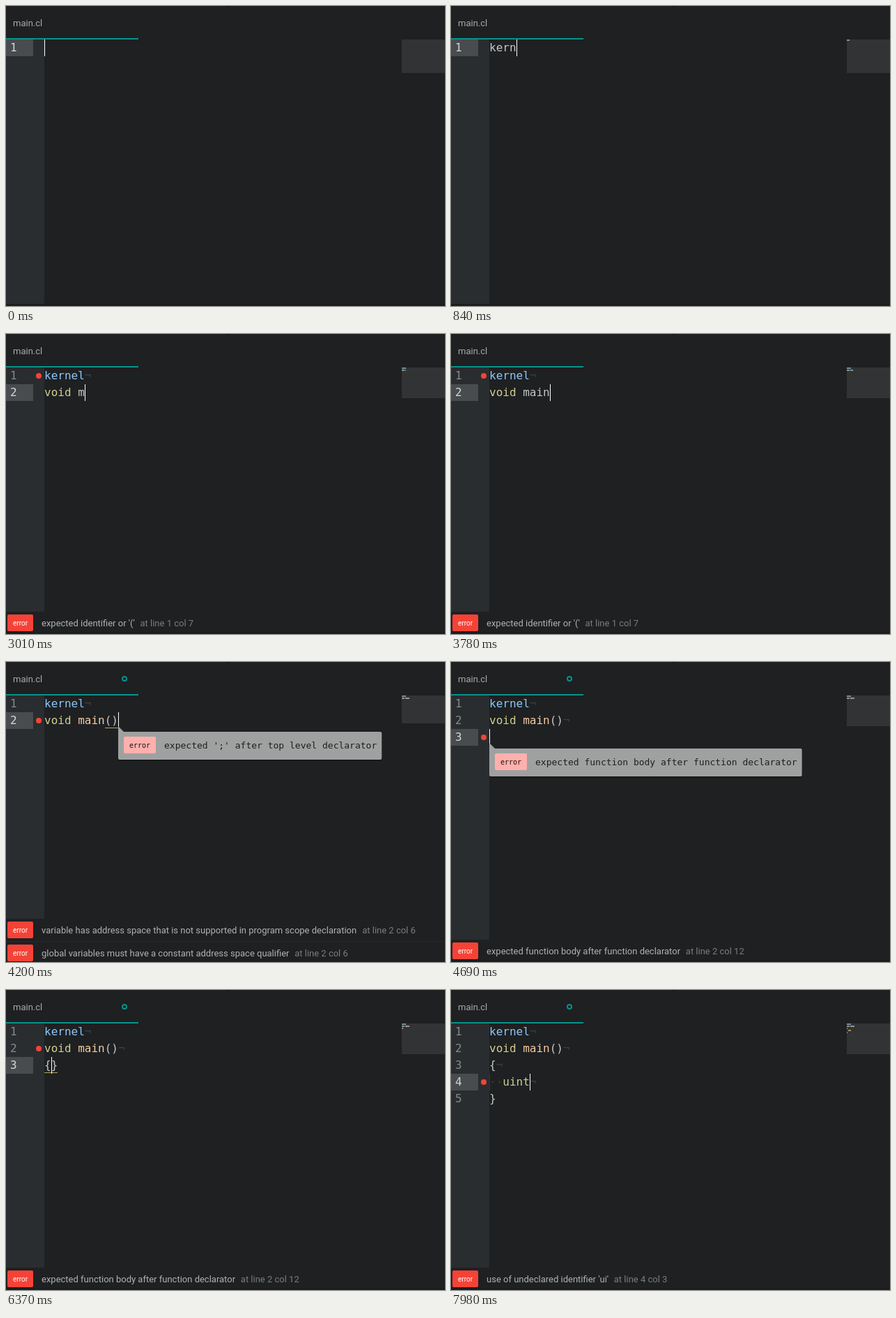
Animation, 630 px wide and 430 px high, one loop 8000 ms. Source, as an HTML page:

```html
<!DOCTYPE html>
<html lang="en">
<head>
<meta charset="utf-8">
<title>Editor with live linting</title>
<style>
  html, body { margin: 0; width: 100%; height: 100%; overflow: hidden; background: #1e2022; }
  svg { display: block; }
  text { white-space: pre; font-family: Roboto, sans-serif; font-size: 13px; }
  .code { font-family: "DejaVu Sans Mono", monospace; font-size: 16px; }
  .tip { font-family: "DejaVu Sans Mono", monospace; font-size: 13px; }
</style>
</head>
<body>
<svg id="stage" width="630" height="430" viewBox="0 0 630 430"></svg>
<script>
const LOOP = 8000, LEFT = 55, TOP = 48, ROW = 24, CHAR = 9.633, MAP = 568;
const TEAL = '#07928a', RED = '#f44336', PLAIN = '#c5c8c6', HIDDEN = '#3d4042';

const identifier = [["expected identifier or '('", 'at line 1 col 7']];
const topLevel = [
  ['variable has address space that is not supported in program scope declaration', 'at line 2 col 6'],
  ['global variables must have a constant address space qualifier', 'at line 2 col 6']
];
const noBody = [['expected function body after function declarator', 'at line 2 col 12']];
const undeclared = [["use of undeclared identifier 'ui'", 'at line 4 col 3']];

const head = 'kernel\nvoid main()\n';
const block = word => head + '{\n  ' + word + '\n}';

// Each entry overrides part of the state from its time on.
const timeline = [[0, {
  text: '', back: 0, errors: [], dot: 0, tip: '', match: false, modified: false, cursor: true
}]];
const at = (time, change) => timeline.push([time, change]);
const type = (prefix, word, times) =>
  times.forEach((time, i) => at(time, { text: prefix + word.slice(0, i + 1) }));

type('', 'kernel', [210, 420, 560, 700, 910, 1050]);
at(1680, { text: 'kernel\n', errors: identifier, dot: 1 });
type('kernel\n', 'void main', [2030, 2170, 2380, 2520, 2730, 2940, 3150, 3290, 3430]);
at(3920, { text: 'kernel\nvoid main()', back: 1 });
at(3990, { match: true });
at(4060, { errors: topLevel, dot: 2, tip: "expected ';' after top level declarator", modified: true });
at(4130, { back: 0 });
at(4410, { errors: noBody, tip: noBody[0][0] });
at(4620, { text: head, dot: 3, match: false });
at(5110, { tip: '' });
at(5250, { cursor: false });
at(5460, { dot: 2 });
at(5670, { cursor: true });
at(6020, { text: head + '{}', back: 1 });
at(6090, { match: true });
at(6510, { text: block(''), back: 2, errors: [], dot: 0, match: false });
at(7140, { text: block('u') });
at(7420, { text: block('ui') });
at(7910, { text: block('uin'), errors: undeclared, dot: 4 });
at(7980, { text: block('uint') });

const escape = s => s.replace(/&/g, '&amp;').replace(/</g, '&lt;');
const rect = (x, y, w, h, fill, extra = '') =>
  `<rect x="${x}" y="${y}" width="${w}" height="${h}" fill="${fill}" ${extra}/>`;
const label = (x, y, s, fill, extra = '') =>
  `<text x="${x}" y="${y}" fill="${fill}" ${extra}>${s}</text>`;
const rowY = row => TOP + row * ROW;

function colorOf(token) {
  if (token === 'kernel') return '#8fc8f8';
  if (token === 'void' || token === 'uint') return '#cfcf8e';
  if (token === 'main') return '#f9cda5';
  return PLAIN;
}

// "main" counts as a function name only once a bracket follows it.
const tokens = line => (line.match(/\b(?:kernel|void|uint)\b|main(?=\()|\s+|\w+|\W/g) || [])
  .map(s => ({ s, color: s === 'main' && !line.includes('(') ? PLAIN : colorOf(s) }));

function codeLine(line, row, last) {
  const y = rowY(row);
  let spans = '', map = '', col = 0;
  for (const { s, color } of tokens(line)) {
    const indent = col === 0 && s.trim() === '';
    spans += `<tspan fill="${indent ? HIDDEN : color}">${indent ? '·'.repeat(s.length) : escape(s)}</tspan>`;
    if (s.trim()) map += rect(MAP + col, TOP + row * 3, s.length, 2, color, 'opacity=".62"');
    col += s.length;
  }
  if (!last) spans += `<tspan fill="${HIDDEN}">¬</tspan>`;
  const guide = line.startsWith('  ') ? rect(LEFT, y, 1, ROW, '#343739') : '';
  return guide + label(LEFT, y + 17, spans, PLAIN, 'class="code"') + map;
}

function panel(errors) {
  const two = errors.length > 1;
  const top = two ? 368 : 398;
  let out = rect(0, top, 630, 430 - top, '#1e2022');
  errors.forEach(([message, place], i) => {
    const y = top + 4 + i * 33;
    if (i) out += rect(0, y - 5, 630, 1, '#26282a');
    out += rect(2, y, 37, 24, RED, 'rx="2"')
      + label(20.5, y + 15.5, 'error', '#fff', 'text-anchor="middle" style="font-size:10px"')
      + label(51, y + 17, `${escape(message)}<tspan dx="8" fill="#7b7d7e">${place}</tspan>`, '#b0b2b3');
  });
  return out + (two ? '' : rect(0, 427, 630, 3, '#1b1d1f'));
}

function tooltip(message, x, y) {
  const width = 73 + message.length * 7.826;
  const box = (dy, fill, extra) => rect(x, y + 4 + dy, width, 40, fill, 'rx="2" ' + extra);
  return box(1, '#000', 'opacity=".25"') + box(2, '#000', 'opacity=".15"')
    + box(0, '#9fa1a0', '')
    + `<path d="M${x} ${y - 4}v11h11z" fill="#9fa1a0"/>`
    + rect(x + 8, y + 11, 46, 24, '#ffb0ac', 'rx="2"')
    + label(x + 16, y + 27, 'error', '#111', 'class="tip" style="font-size:10px"')
    + label(x + 66, y + 28, escape(message), '#1c1e1f', 'class="tip"');
}

function draw(state) {
  const { text, back, errors, dot, tip, match, modified, cursor } = state;
  const lines = text.split('\n');
  const before = text.slice(0, text.length - back).split('\n');
  const row = before.length - 1;
  const col = before[row].length;
  const x = Math.round(LEFT + col * CHAR);
  const y = rowY(row);
  const viewport = [48, 44, 40][errors.length];

  let out = rect(0, 0, 630, 430, '#1e2022')
    + rect(318, 0, 4, 1, '#101112')
    + label(10, 29, 'main.cl', '#a9abac')
    + rect(0, 48, LEFT, 382, '#292d30')
    + rect(0, 46, 190, 2, TEAL)
    + rect(0, y, 39, ROW, '#484c4e')
    + rect(MAP, TOP, 62, viewport, '#323335');

  if (modified) out += `<circle cx="170" cy="24" r="3" fill="none" stroke="${TEAL}" stroke-width="2"/>`;
  lines.forEach((line, i) => {
    out += label(6, rowY(i) + 17, i + 1, i === row ? '#d3d6d7' : '#85898b', 'class="code"')
      + codeLine(line, i, i === lines.length - 1);
  });
  if (dot) out += `<circle cx="47" cy="${rowY(dot - 1) + 12}" r="4" fill="${RED}"/>`;
  if (match) {
    const start = Math.max(lines[row].indexOf('('), lines[row].indexOf('{'));
    out += rect(Math.round(LEFT + start * CHAR), y + 22, 19, 1, '#b5a55f');
  }
  if (cursor) out += rect(x, y, 1, ROW, '#fff');
  out += errors.length ? panel(errors) : rect(0, 427, 630, 3, '#1b1d1f');
  if (tip) out += tooltip(tip, x, y + ROW);
  return out;
}

const stage = document.getElementById('stage');
let shown = -1;

function render() {
  const time = performance.now() % LOOP;
  const past = timeline.filter(([start]) => start <= time);
  if (past.length !== shown) {
    shown = past.length;
    stage.innerHTML = draw(Object.assign({}, ...past.map(([, change]) => change)));
  }
  requestAnimationFrame(render);
}
render();
</script>
</body>
</html>
```
